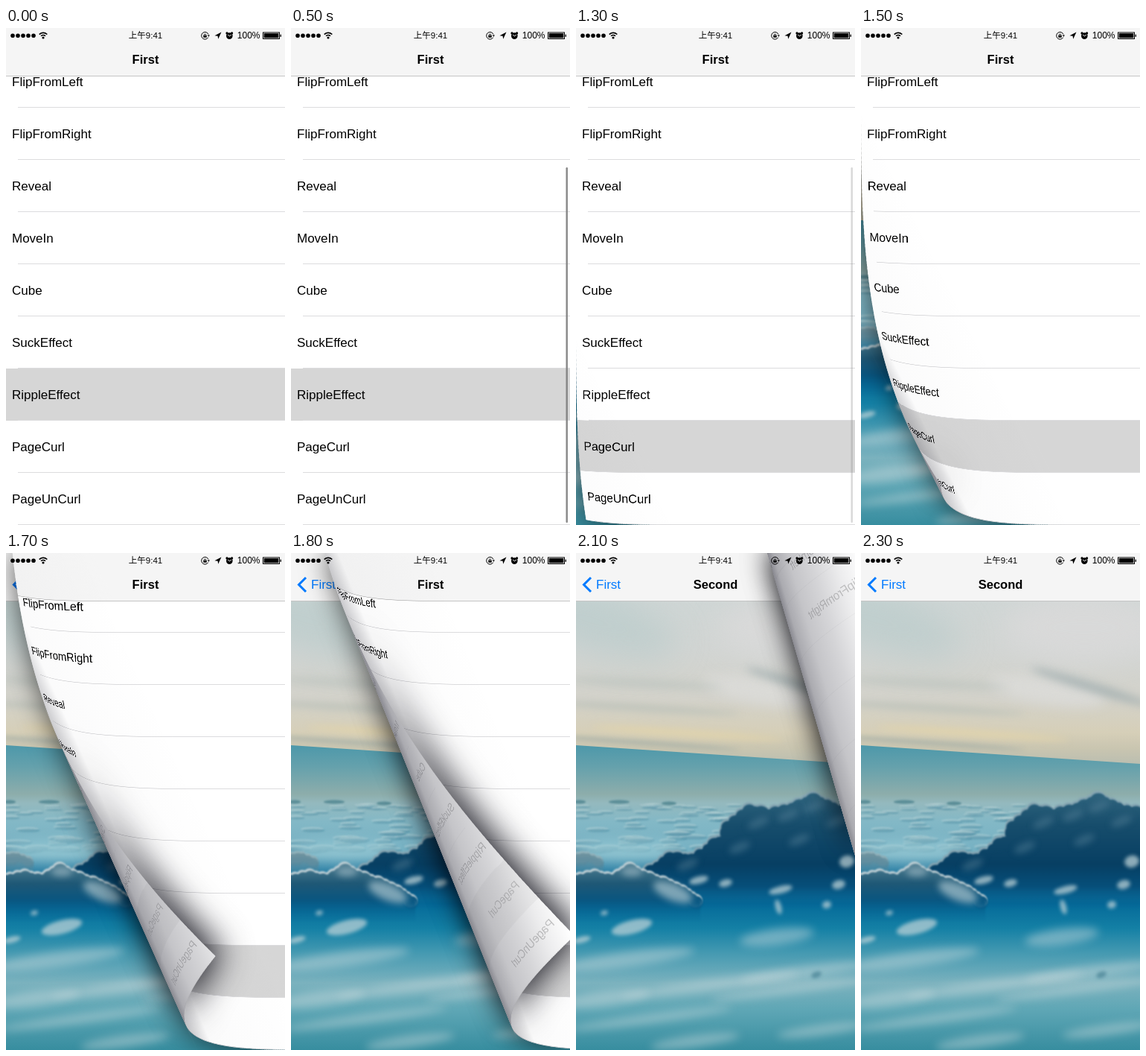
Write an HTML page with a canvas that moves like this. It is 375 px wide and 667 px high and loops after 2.4 s.

```html
<!DOCTYPE html>
<html lang="en">
<head>
<meta charset="utf-8">
<title>Page curl</title>
<style>
  html, body { margin: 0; width: 100%; height: 100%; overflow: hidden; background: #fff; }
  canvas { display: block; width: 375px; height: 667px; }
</style>
</head>
<body>
<canvas id="stage" width="375" height="667"></canvas>
<script>
const W = 375, H = 667, LOOP = 2400, STEP = 100;
const RADIUS = 143, SLICES = 160;
const FONT = '"Liberation Sans", Arial, "Noto Sans CJK SC", "Noto Sans CJK", sans-serif';
const BLUE = '#007aff';
const ROWS = ['FlipFromLeft', 'FlipFromRight', 'Reveal', 'MoveIn', 'Cube',
  'SuckEffect', 'RippleEffect', 'PageCurl', 'PageUnCurl'];
const RIPPLE = 6, CURL = 7;

// time, fold line distance from the origin, fold angle in degrees
const FOLD = [[1100, 305, 27.2], [1300, 178, 27], [1500, 40, 26.6], [1700, -105, 24.1],
  [1900, -256, 19.8], [2100, -390, 16.2], [2300, -520, 13]];

const clamp = v => Math.max(0, Math.min(1, v));

function makeLayer(scale = 1) {
  const canvas = document.createElement('canvas');
  canvas.width = W * scale;
  canvas.height = H * scale;
  const ctx = canvas.getContext('2d');
  ctx.scale(scale, scale);
  return ctx;
}

function seeded(seed) {
  return () => (seed = (seed * 16807) % 2147483647) / 2147483647;
}

function gradient(ctx, x0, y0, x1, y1, stops) {
  const g = ctx.createLinearGradient(x0, y0, x1, y1);
  stops.forEach(([at, color]) => g.addColorStop(at, color));
  return g;
}

function label(ctx, text, x, y, font, color = '#000', align = 'left') {
  ctx.font = `${font} ${FONT}`;
  ctx.fillStyle = color;
  ctx.textAlign = align;
  ctx.fillText(text, x, y);
}

function box(ctx, x, y, w, h, color) {
  ctx.fillStyle = color;
  ctx.fillRect(x, y, w, h);
}

function navBar(ctx, title) {
  box(ctx, 0, 0, W, 64, '#f5f5f5');
  box(ctx, 0, 64, W, 1, '#c4c4c4');
  label(ctx, title, 187.5, 48, 'bold 16.5px', '#000', 'center');
}

/* ---- cloud scene ---- */

function paintClouds(ctx) {
  const rand = seeded(41);

  function blob(x, y, rx, ry, color, blur, tilt = 0) {
    ctx.filter = `blur(${blur}px)`;
    ctx.fillStyle = color;
    ctx.beginPath();
    ctx.ellipse(x, y, rx, ry, tilt, 0, 7);
    ctx.fill();
    ctx.filter = 'none';
  }

  function cloud(ridge, floor, size, rim, body) {
    const shape = new Path2D();
    shape.moveTo(ridge[0][0], floor);
    ridge.forEach(p => shape.lineTo(...p));
    shape.lineTo(ridge[ridge.length - 1][0], floor);
    shape.closePath();
    const puffs = new Path2D();
    ridge.slice(1).forEach(([x, y], i) => {
      const [px, py] = ridge[i];
      for (let k = 0; k < 1; k += 0.34) {
        const r = size * (0.6 + rand() * 0.6);
        const cx = px + (x - px) * k, cy = py + (y - py) * k + r * 0.6;
        puffs.moveTo(cx + r, cy);
        puffs.arc(cx, cy, r, 0, 7);
      }
    });
    const top = Math.min(...ridge.map(p => p[1]));
    ctx.filter = 'blur(1px)';
    ctx.fillStyle = rim;
    ctx.fill(puffs);
    ctx.translate(1, 3);
    ctx.fillStyle = gradient(ctx, 0, top, 0, floor, body);
    ctx.fill(shape);
    ctx.fill(puffs);
    ctx.translate(-1, -3);
    ctx.filter = 'none';
  }

  // sky
  ctx.fillStyle = gradient(ctx, 0, 64, 0, 285, [[0, '#cfd6d5'], [0.3, '#d2d5d3'],
    [0.6, '#d3d2ca'], [0.8, '#d6cfb8'], [0.9, '#c9c5b0'], [1, '#b9bdb0']]);
  ctx.fillRect(0, 64, W, 230);
  blob(20, 90, 120, 40, 'rgba(176,199,200,.5)', 22, 0.3);
  blob(300, 100, 110, 45, 'rgba(218,218,218,.9)', 18);
  blob(250, 185, 80, 18, 'rgba(220,220,218,.8)', 8, 0.15);
  blob(310, 180, 85, 6, 'rgba(150,166,168,.7)', 6, 0.3);
  blob(90, 175, 110, 5, 'rgba(180,190,186,.6)', 6, 0.05);
  blob(90, 208, 130, 5, 'rgba(180,188,182,.6)', 5, 0.06);
  blob(150, 242, 130, 5, 'rgba(226,212,172,.8)', 4, 0.07);
  blob(80, 254, 140, 3, 'rgba(158,172,165,.7)', 3, 0.07);

  // haze and lower layers
  ctx.fillStyle = gradient(ctx, 0, 258, 0, H, [[0, '#4d98aa'], [0.07, '#65a1ac'],
    [0.16, '#8dadab'], [0.19, '#94b9be'], [0.25, '#83b8c6'], [0.36, '#74b0c3'],
    [0.43, '#1c769f'], [0.52, '#056a99'], [0.6, '#1480a5'], [0.68, '#4499b1'],
    [0.78, '#7bb2be'], [0.87, '#5ea6b5'], [1, '#378d9f']]);
  ctx.beginPath();
  ctx.moveTo(0, 258);
  ctx.lineTo(W, 283);
  ctx.lineTo(W, H);
  ctx.lineTo(0, H);
  ctx.fill();

  for (let i = 0; i < 90; i++) {
    const depth = rand();
    const x = rand() * 260, y = 337 + depth * 62, rx = 6 + depth * 14 * rand() + 4;
    blob(x, y, rx, 1.5 + depth * 2, 'rgba(190,215,218,.45)', 1);
    blob(x + 2, y + 2, rx, 1 + depth * 2, 'rgba(62,130,155,.45)', 1);
  }
  [[5, 334, 8], [58, 334, 14], [125, 336, 10]].forEach(([x, y, r]) =>
    blob(x, y, r, 2.5, '#5b8d97', 1));
  blob(70, 398, 70, 12, 'rgba(150,200,212,.8)', 8);

  cloud([[-5, 405], [15, 402], [36, 412]], 425, 7, '#91b0b9',
    [[0, '#6d929f'], [1, 'rgba(70,130,155,.4)']]);

  cloud([[100, 420], [125, 402], [155, 405], [185, 383], [207, 378], [203, 360], [232, 338],
    [255, 343], [290, 336], [318, 324], [345, 335], [380, 343]], 475, 10, '#86a5b2',
    [[0, '#2d627c'], [0.25, '#174d6c'], [0.6, '#073f63'], [0.8, '#064f7a'], [1, 'rgba(5,100,147,0)']]);
  [[245, 362], [285, 352], [320, 340], [350, 360], [220, 395], [300, 385], [150, 418]].forEach(([x, y]) =>
    blob(x, y, 15, 6, 'rgba(80,125,148,.5)', 4, -0.4));

  cloud([[-5, 432], [25, 427], [50, 432], [72, 418], [98, 430], [125, 440], [150, 452],
    [166, 465]], 492, 9, '#c2d1d6',
    [[0, '#4a7a8e'], [0.3, '#1f5876'], [0.6, '#0a5680'], [1, 'rgba(5,106,153,0)']]);
  blob(130, 455, 28, 11, 'rgba(160,190,200,.75)', 5, 0.4);
  blob(75, 428, 14, 6, 'rgba(165,190,200,.6)', 4);

  // bright scraps and long wisps
  [[165, 439, 13, 5], [201, 443, 9, 5], [275, 452, 16, 5], [272, 475, 4, 10], [337, 472, 6, 5],
    [353, 445, 9, 6], [364, 414, 10, 8], [75, 502, 28, 9], [38, 483, 5, 3], [8, 519, 12, 4]]
    .forEach(([x, y, rx, ry]) => blob(x, y, rx, ry, 'rgba(186,208,214,.75)', 2.5, -0.25));
  [[270, 515, 50, 11], [70, 545, 90, 10], [310, 562, 90, 8], [180, 580, 120, 8],
    [40, 598, 60, 10], [290, 585, 110, 6], [160, 655, 60, 8], [100, 625, 110, 6], [330, 640, 60, 7]]
    .forEach(([x, y, rx, ry]) => blob(x, y, rx, ry, 'rgba(205,220,222,.45)', 6, -0.13));
  blob(323, 566, 7, 4, 'rgba(60,120,140,.6)', 2, -0.4);
}

const second = makeLayer();
paintClouds(second);
navBar(second, 'Second');
second.strokeStyle = BLUE;
second.lineWidth = 3;
second.beginPath();
second.moveTo(20, 33);
second.lineTo(10.5, 42.5);
second.lineTo(20, 52);
second.stroke();
label(second, 'First', 27, 48, '17px', BLUE);

/* ---- list page ---- */

function paintList(ctx, t) {
  const barAlpha = Math.min(clamp((t - 200) / 300), clamp((1400 - t) / 300));
  box(ctx, 0, 0, W, H, '#fff');
  const mark = (row, alpha) =>
    box(ctx, 0, 457 + (row - RIPPLE) * 70, W, 70, `rgba(214,214,214,${alpha})`);
  mark(RIPPLE, clamp((1110 - t) / 410));
  if (t >= 1100) mark(CURL, 1);
  ROWS.forEach((name, i) => {
    label(ctx, name, 8, 78 + i * 70, '17px');
    box(ctx, 16, 106 + i * 70, W, 1, '#dcdcde');
  });
  ctx.fillStyle = `rgba(128,128,128,${0.9 * barAlpha})`;
  ctx.beginPath();
  ctx.roundRect(369.5, 187, 2.5, 477, 1.25);
  ctx.fill();
  navBar(ctx, 'First');
}

/* ---- curl ---- */

const sheet = makeLayer(2), front = makeLayer(), back = makeLayer();

function foldAt(t) {
  const i = Math.max(1, FOLD.findIndex(k => k[0] >= t));
  const [a, b] = [FOLD[i - 1], FOLD[i]];
  const f = (t - a[0]) / (b[0] - a[0]);
  const mix = k => a[k] + (b[k] - a[k]) * f;
  return { line: mix(1), angle: mix(2) * Math.PI / 180 };
}

function curl(ctx, t) {
  const { line, angle } = foldAt(t);
  const cos = Math.cos(angle), sin = Math.sin(angle);
  // this reflection is its own inverse: page axes <-> fold axes
  const turn = c => c.transform(-cos, sin, sin, cos, 0, 0);
  const reach = sin * H;

  paintList(sheet, t);
  front.clearRect(0, 0, W, H);
  back.clearRect(0, 0, W, H);

  function slice(c, u0, u1, m0, m1) {
    const k = (m1 - m0) / (u1 - u0);
    const pad = Math.min(3, 0.6 / Math.max(0.01, Math.abs(k)));
    c.save();
    turn(c);
    c.translate(m0, 0);
    c.scale(k, 1);
    c.translate(-u0, 0);
    c.beginPath();
    c.rect(u0 - pad, -500, u1 - u0 + 2 * pad, 2000);
    c.clip();
    turn(c);
    c.drawImage(sheet.canvas, 0, 0, W, H);
    c.restore();
  }

  function shade(c, from, to, stops) {
    c.save();
    c.globalCompositeOperation = 'source-atop';
    turn(c);
    c.fillStyle = gradient(c, from, 0, to, 0, stops.map(([at, a]) => [at, `rgba(45,45,58,${a})`]));
    c.fillRect(-1000, -500, 2500, 2000);
    c.restore();
  }

  front.save();
  turn(front);
  front.beginPath();
  front.rect(line - 2000, -500, 2000.5, 2000);
  front.clip();
  turn(front);
  paintList(front, t);
  front.restore();

  const bent = a => line + RADIUS * Math.sin(a);
  for (let i = 0; i < SLICES; i++) {
    const a0 = i / SLICES * Math.PI, a1 = (i + 1) / SLICES * Math.PI;
    const u0 = line + RADIUS * a0;
    if (u0 > reach) break;
    slice(i < SLICES / 2 ? front : back, u0, line + RADIUS * a1, bent(a0), bent(a1));
  }
  const flat = line + RADIUS * Math.PI;
  if (flat < reach) slice(back, flat, reach, line, line - (reach - flat));

  shade(front, line, line + RADIUS, [[0, 0], [0.85, 0.02], [1, 0.25]]);
  back.globalCompositeOperation = 'source-atop';
  box(back, 0, 0, W, H, 'rgba(255,255,255,.8)');
  back.globalCompositeOperation = 'source-over';
  shade(back, line + RADIUS, line,
    [[0, 0.55], [0.05, 0.4], [0.18, 0.28], [0.38, 0.2], [0.6, 0.09], [0.85, 0]]);

  ctx.save();
  ctx.shadowColor = 'rgba(0,0,0,.65)';
  ctx.shadowBlur = 36;
  ctx.drawImage(front.canvas, 0, 0);
  ctx.shadowColor = 'rgba(0,0,10,.9)';
  ctx.shadowBlur = 45;
  ctx.shadowOffsetX = cos * 10;
  ctx.shadowOffsetY = -sin * 10;
  ctx.drawImage(back.canvas, 0, 0);
  ctx.restore();
}

/* ---- status bar ---- */

function statusBar(ctx) {
  const disc = (x, y, r) => {
    ctx.beginPath();
    ctx.arc(x, y, r, 0, 7);
    ctx.fill();
  };
  const line = (...pts) => {
    ctx.beginPath();
    pts.forEach(p => ctx.lineTo(...p));
    ctx.stroke();
  };
  ctx.fillStyle = ctx.strokeStyle = '#000';
  for (let i = 0; i < 5; i++) disc(9 + i * 7, 10.3, 2.8);

  ctx.lineWidth = 1.7;
  disc(50, 13, 1.6);
  [4, 7.2].forEach(r => {
    ctx.beginPath();
    ctx.arc(50, 13.5, r, -Math.PI * 0.76, -Math.PI * 0.24);
    ctx.stroke();
  });
  label(ctx, '上午9:41', 187.5, 14.3, '500 11.5px', '#000', 'center');

  // rotation lock
  ctx.lineWidth = 1;
  ctx.beginPath();
  ctx.arc(267.5, 10.3, 4.8, 0.5, 5.9);
  ctx.stroke();
  ctx.fillRect(265.3, 9.8, 4.4, 3);
  ctx.beginPath();
  ctx.arc(267.5, 9.6, 1.4, Math.PI, 0);
  ctx.stroke();
  ctx.beginPath();
  [[270.6, 9.4], [274, 9.4], [272.3, 11.8]].forEach(p => ctx.lineTo(...p));
  ctx.fill();

  // location arrow
  ctx.beginPath();
  [[289.5, 5.5], [280.5, 10.2], [284.6, 10.7], [285.2, 14.8]].forEach(p => ctx.lineTo(...p));
  ctx.fill();

  // alarm
  disc(300.3, 10.6, 4.3);
  disc(297, 6.9, 1.6);
  disc(303.6, 6.9, 1.6);
  ctx.strokeStyle = '#fff';
  line([298.2, 9], [300.3, 10.9], [302.8, 9.2]);

  label(ctx, '100%', 310.8, 14.4, '12px');

  ctx.strokeStyle = '#000';
  ctx.strokeRect(345.5, 6, 22, 8.5);
  ctx.fillRect(346.7, 7.2, 19.6, 6.1);
  ctx.fillRect(368.6, 8.7, 1.3, 3.2);
}

/* ---- playback ---- */

const stage = document.getElementById('stage').getContext('2d');
const start = performance.now();
let shown = -1;

function draw(t) {
  if (t <= 1100) {
    paintList(stage, t);
  } else {
    stage.drawImage(second.canvas, 0, 0);
    if (t < 2300) curl(stage, t);
  }
  statusBar(stage);
}

function tick() {
  const elapsed = Math.max(0, performance.now() - start) % LOOP;
  const t = Math.floor(elapsed / STEP) * STEP;
  if (t !== shown) draw(shown = t);
  requestAnimationFrame(tick);
}
tick();
</script>
</body>
</html>
```
